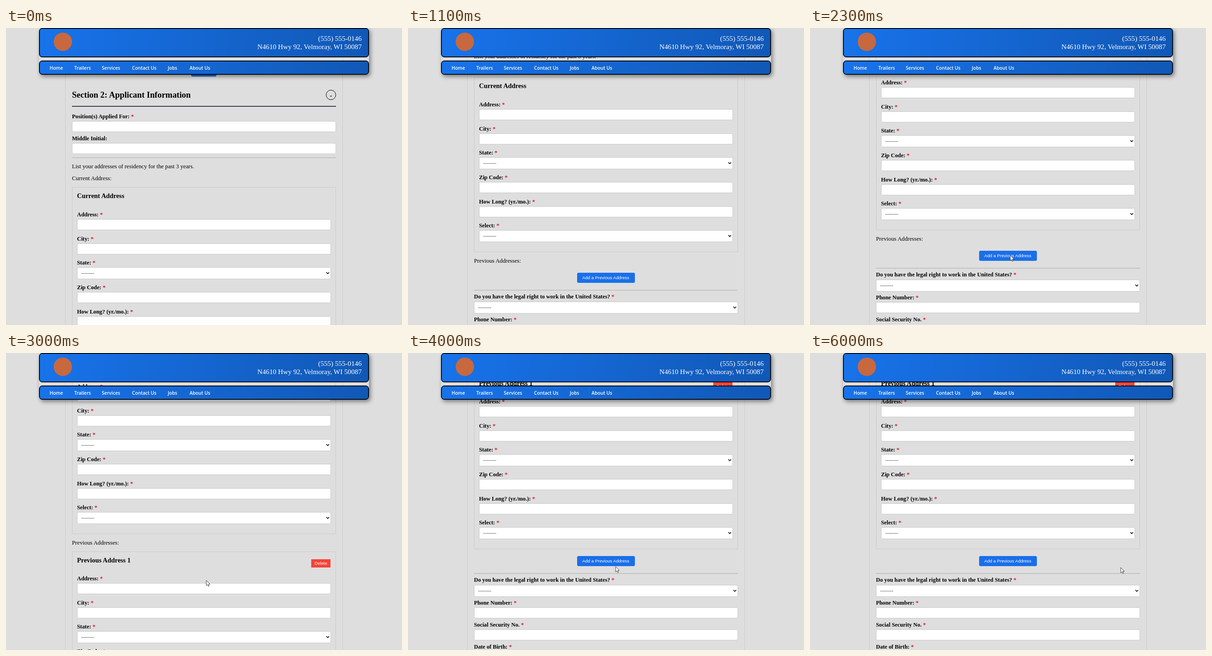
An HTML page for the animation above (6.1 s loop, 864x648 px).

```html
<!DOCTYPE html>
<html lang="en">
<head>
<meta charset="utf-8">
<title>Application form</title>
<style>
  html, body { margin: 0; width: 100%; height: 100%; overflow: hidden; }
  body { position: relative; background: #dedede; color: #000; font-family: "Liberation Serif", serif; }
  div, svg { position: absolute; box-sizing: border-box; }
  #stage { left: 0; top: 0; width: 864px; height: 648px; overflow: hidden; }
  #card { left: 129px; top: -2px; width: 606px; height: 660px; border: 1px solid #cbcbcb; }
  #page, #rest, .block { left: 0; top: 0; width: 864px; will-change: transform; }
  .text { line-height: 20px; margin-top: -10px; white-space: pre; }
  .h2 { font-weight: bold; font-size: 18.4px; }
  .h3 { font-weight: bold; font-size: 14.4px; }
  .label { font-weight: bold; font-size: 12.3px; }
  .label i { color: #e8101c; font-style: normal; }
  .para { font-size: 12.7px; }
  .field { background: #fff; border: 1px solid #c9c9c9; border-radius: 3px; }
  .pick { font: 9.6px/24px "Liberation Sans", sans-serif; padding-left: 8px; }
  .pick svg { right: 2px; top: 9px; }
  .spin { right: 7px; top: 5px; visibility: hidden; }
  .frame { border: 1px solid #cbcbcb; }
  .btn { background: #1a6fe9; color: #fff; border-radius: 3px; text-align: center;
         font: 9.6px/22px "Liberation Sans", sans-serif; }
  .del { background: #f44336; border-radius: 0; line-height: 18px; }
  .fold { border: 1px solid #000; border-radius: 50%; text-align: center; font-size: 16px; line-height: 24px; }
  #head { left: 72px; top: 0; width: 720px; height: 102px; border-radius: 7px;
          box-shadow: 3px 4px 10px rgba(0, 0, 0, .45); }
  .bar { left: 0; width: 720px; border: 1px solid #000; border-radius: 7px; color: #fff;
         background: linear-gradient(100deg, #1873ea, #1158b6) border-box;
         box-shadow: inset 0 0 0 1px rgba(0, 0, 0, .75); }
  .contact { right: 15px; top: 13px; font-size: 15.2px; line-height: 18px; text-align: right; white-space: pre; }
  .nav { font: 600 10.2px/20px "Open Sans", sans-serif; }
  #logo { left: 31px; top: 9px; width: 40px; height: 40px; border-radius: 50%; background: #c8683f; }
  #cursor { left: 0; top: 0; }
</style>
</head>
<body>
<div id="stage">
  <div id="card"></div>
  <div id="page"></div>
  <div id="head">
    <div class="bar" style="top:0;height:64px">
      <div id="logo"></div>
      <div class="contact">(555) 555-0146
N4610 Hwy 92, Velmoray, WI 50087</div>
    </div>
    <div class="bar" id="menu" style="top:71px;height:31px"></div>
  </div>
  <svg id="cursor" width="12" height="17" viewBox="-1 -1 12 17">
    <path d="M0 0V11.5L2.7 9.2L4.5 13.2L6.2 12.4L4.5 8.5H8Z" fill="#fff" stroke="#333" stroke-width=".9"/>
  </svg>
</div>
<script>
const LOOP = 6100, STEP = 100, BLOCK_PITCH = 389;
const $ = id => document.getElementById(id);

const box = (cls, x, y, w, h, inner = '') =>
  `<div class="${cls}" style="left:${x}px;top:${y}px;width:${w}px;height:${h}px">${inner}</div>`;
const text = (cls, x, y, s) => `<div class="text ${cls}" style="left:${x}px;top:${y}px">${s}</div>`;
const label = (x, y, s, must = true) => text('label', x, y, s + (must ? ' <i>*</i>' : ''));
const rule = (y, h, color) => `<div style="left:144px;top:${y}px;width:576px;height:${h}px;background:${color}"></div>`;

const chevron = '<svg width="8" height="6"><path d="M1 1L4 4.2L7 1" fill="none" stroke="#000" stroke-width="1.6"/></svg>';
const spinner = '<svg class="spin" width="7" height="12"><path d="M0 5L3.5 0L7 5ZM0 7L3.5 12L7 7Z" fill="#777"/></svg>';
const input = (x, y, w, inner) => box('field', x, y, w, 24, inner);
const select = (x, y, w) => box('field pick', x, y, w, 26, '---------' + chevron);

// One address form; y is the top of its frame.
function address(y, title, shift = 0, extra = '') {
  let html = box('frame', 144, y, 576, 382 + shift) + text('h3', 155, y + 19, title) + extra;
  let top = y + 70 + shift;
  for (const name of ['Address:', 'City:', 'State:', 'Zip Code:', 'How Long? (yr./mo.):', 'Select:']) {
    const pick = name === 'State:' || name === 'Select:';
    html += label(155, top - 10, name);
    html += pick ? select(155, top, 553.5) : input(155, top, 553.5, name[0] === 'H' ? spinner : '');
    top += pick ? 54 : 52.5;
  }
  return html;
}

function previous(n) {
  const y = 767 + (n - 1) * BLOCK_PITCH;
  const del = box('btn del', 666, y + 17, 42, 18, 'Delete');
  return `<div class="block" id="prev${n}">${address(y, 'Previous Address ' + n, -1, del)}</div>`;
}

$('page').innerHTML =
  box('btn', 404, 84, 55, 22) +
  text('h2', 144, 146, 'Section 2: Applicant Information') +
  box('fold', 698, 135, 22, 22, '-') +
  rule(170, 1, '#1c1c20') + rule(171, 1, '#6a6a6e') +
  label(144, 193, 'Position(s) Applied For:') + input(144, 203, 576) +
  label(144, 241, 'Middle Initial:', false) + input(144, 251, 576) +
  rule(282, 2, '#c4c4c4') +
  text('para', 144, 302, 'List your addresses of residency for the past 3 years.') +
  text('para', 144, 328, 'Current Address:') +
  address(347, 'Current Address') +
  text('para', 144, 748, 'Previous Addresses:') +
  previous(1) + previous(2) +
  '<div id="rest">' +
  box('btn', 368.5, 774, 126, 22, 'Add a Previous Address') +
  rule(811, 2, '#c4c4c4') +
  label(144, 826, 'Do you have the legal right to work in the United States?') + select(144, 837, 576) +
  label(144, 876, 'Phone Number:') + input(144, 886, 576) +
  label(144, 924, 'Social Security No.') + input(144, 934, 576) +
  label(144, 972, 'Date of Birth:') + input(144, 982, 576) +
  '</div>';

const menu = [['Home', 95], ['Trailers', 149], ['Services', 209], ['Contact Us', 275], ['Jobs', 353], ['About Us', 400.5]];
$('menu').innerHTML = menu.map(([s, x]) => text('nav', x - 73, 15, s)).join('');

// Keys are [time, value, ...], joined by straight lines.
const scrollKeys = [[0, 0], [600, 0], [800, 95], [1200, 288], [2900, 288], [3000, 334], [3400, 582], [3700, 720]];
const cursorKeys = [[1300, 900, 255], [1400, 862, 264], [1800, 600, 400], [2200, 437, 496], [3000, 437, 496],
  [3400, 432, 493], [3700, 432, 493], [4000, 453, 466], [4300, 446, 457], [4700, 446, 457], [5200, 678, 468]];

function at(keys, t) {
  const i = keys.findIndex(k => k[0] > t);
  if (i === 0) return keys[0].slice(1);
  if (i < 0) return keys[keys.length - 1].slice(1);
  const a = keys[i - 1], b = keys[i], f = (t - a[0]) / (b[0] - a[0]);
  return a.slice(1).map((v, j) => Math.round(v + (b[j + 1] - v) * f));
}

const move = (el, x, y) => { el.style.transform = `translate(${x}px,${y}px)`; };
const show = (el, on) => { el.style.visibility = on ? 'visible' : 'hidden'; };
const spin = $('prev1').querySelector('.spin');

function draw(now) {
  const t = Math.floor(now % LOOP / STEP) * STEP;
  const blocks = t < 2500 ? 0 : t >= 4500 && t < 5300 ? 2 : 1;
  const [x, y] = at(cursorKeys, t);
  move($('page'), 0, -at(scrollKeys, t)[0]);
  move($('rest'), 0, blocks * BLOCK_PITCH);
  show($('prev1'), blocks > 0);
  show($('prev2'), blocks > 1);
  show(spin, t === 3400);
  move($('cursor'), x - 1, y - 1);
}

const start = performance.now();
function tick() {
  draw(performance.now() - start);
  requestAnimationFrame(tick);
}
tick();
</script>
</body>
</html>
```
